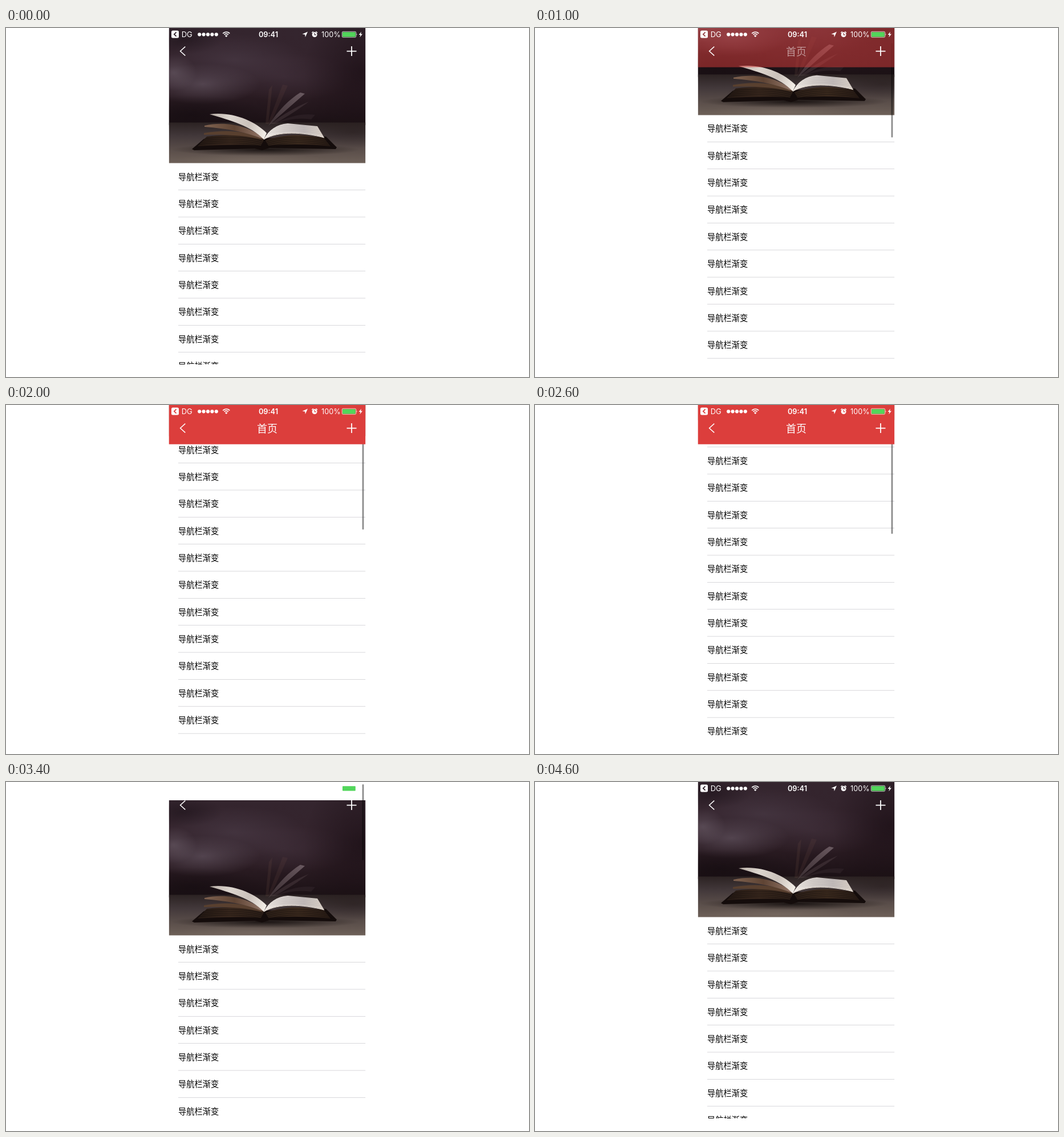
Write an HTML page with a canvas that moves like this. It is 917 by 611 pixels and loops after 4.8 s.

```html
<!DOCTYPE html>
<html lang="zh-CN">
<head>
<meta charset="utf-8">
<title>导航栏渐变</title>
<style>
html, body { margin: 0; width: 100%; height: 100%; overflow: hidden; background: #fff; }
canvas { display: block; width: 917px; height: 611px; }
</style>
</head>
<body>
<canvas id="stage"></canvas>
<script>
const W = 917, H = 611, LEFT = 285.5, RIGHT = 630.4, BOTTOM = 589;
const PHOTO = 236.6, ROW = 47.35, ROWS = 40, NAV = 68.7;
const STEP = 200;
const CJK = '"Noto Sans CJK SC", "Noto Sans CJK", sans-serif';
const LATIN = 'Inter, Roboto, sans-serif';
// Scroll offset per screen refresh: drag up, pull back, overscroll, settle.
const SCROLL = [0, 0, 0, 0, 35.5, 84.2, 98, 107.5, 133, 159, 182, 205.5,
  227.7, 210, 177.5, 56, -8, -32, -17, -0.4, 0, 0, 0, 0];

const canvas = document.getElementById('stage');
const ratio = window.devicePixelRatio || 1;
canvas.width = W * ratio;
canvas.height = H * ratio;
const ctx = canvas.getContext('2d');

function shape(d, fill) {
  ctx.fillStyle = fill;
  ctx.fill(new Path2D(d), 'evenodd');
}

function line(d, color, width) {
  ctx.strokeStyle = color;
  ctx.lineWidth = width;
  ctx.stroke(new Path2D(d));
}

function text(str, x, y, font, color, align = 'left') {
  ctx.font = font;
  ctx.fillStyle = color;
  ctx.textAlign = align;
  ctx.fillText(str, x, y);
}

function disc(x, y, r) {
  ctx.beginPath();
  ctx.arc(x, y, r, 0, Math.PI * 2);
  ctx.fill();
}

function fade(x0, y0, x1, y1, ...colors) {
  const g = ctx.createLinearGradient(x0, y0, x1, y1);
  colors.forEach((c, i) => g.addColorStop(i / (colors.length - 1), c));
  return g;
}

function glow(x, y, rx, ry, rgb, alpha) {
  ctx.save();
  ctx.translate(x, y);
  ctx.scale(rx, ry);
  const g = ctx.createRadialGradient(0, 0, 0, 0, 0, 1);
  g.addColorStop(0, `rgba(${rgb},${alpha})`);
  g.addColorStop(0.5, `rgba(${rgb},${alpha * 0.5})`);
  g.addColorStop(1, `rgba(${rgb},0)`);
  ctx.fillStyle = g;
  ctx.fillRect(-1, -1, 2, 2);
  ctx.restore();
}

function drawBook() {
  // covers and page block
  shape('M326 212 L347 194 L452 193 L561 190 L580 209 L578 212 L462 210 L449 214 L436 211 L330 214Z', '#140c0b');
  shape('M336 207 L352 190 C390 185 430 187 452 196 L447 206 C410 203 372 205 336 207Z',
    fade(336, 0, 450, 0, '#231813', '#38271d', '#2b1e17'));
  shape('M455 197 C490 183 530 187 558 193 L569 207 C530 203 490 203 460 206Z',
    fade(455, 0, 570, 0, '#2b1e17', '#3b2a1e', '#281b15'));
  for (let i = 0; i < 4; i++) {
    const y = i * 3.2;
    line(`M${348 - y} ${194 + y} C380 ${190 + y} 425 ${190 + y} 449 ${198 + y}`, 'rgba(16,11,9,.55)', 0.9);
    line(`M457 ${199 + y} C490 ${188 + y} 530 ${190 + y} ${561 + y} ${196 + y}`, 'rgba(16,11,9,.55)', 0.9);
  }
  // lifted pages
  shape('M347 184 C385 177 425 180 452 196 C420 188 385 186 347 187Z', '#59402f');
  shape('M348 171 C388 162 432 173 453 195 C420 182 388 176 348 173Z', fade(348, 0, 453, 0, '#7f6250', '#5f4434', '#95786a'));
  shape('M357 151 C396 146 436 162 457 184 L452 195 C429 171 394 162 357 151Z',
    fade(357, 150, 456, 190, '#b9aea6', '#dcd5ce', '#cbc2bb', '#f6f1ea'));
  shape('M452 195 C461 178 474 169 494 167 L546 172 L558 192 C520 182 478 180 452 195Z',
    fade(452, 0, 558, 0, '#f3eee8', '#d4cdca', '#c2bbba', '#dcd2c8'));
  line('M452 195 C478 180 520 182 558 192', '#eae1d6', 1);
  for (let i = 0; i < 4; i++) {
    line(`M${470 - i * 3} ${175 + i * 3} C495 ${168 + i * 3} 520 ${170 + i * 3} ${546 + i * 3} ${175 + i * 3.5}`, 'rgba(120,110,112,.2)', 0.7);
  }
}

function drawPhoto() {
  ctx.save();
  ctx.beginPath();
  ctx.rect(LEFT, 0, RIGHT - LEFT, PHOTO);
  ctx.clip();
  ctx.fillStyle = fade(0, 0, 0, 170, '#34252e', '#34242d', '#2b1c23', '#1a1014');
  ctx.fillRect(LEFT, 0, 346, 170);
  glow(345, 98, 100, 36, '118,104,118', 0.5);
  glow(294, 78, 40, 32, '118,104,116', 0.5);
  glow(400, 56, 125, 46, '92,78,92', 0.36);
  glow(490, 86, 120, 42, '84,66,80', 0.32);
  glow(622, 75, 100, 120, '24,12,18', 0.6);
  glow(325, 152, 130, 34, '20,12,16', 0.6);
  glow(310, 20, 70, 26, '26,17,24', 0.5);

  ctx.fillStyle = fade(0, 165, 0, PHOTO, '#2b2222', '#42383a', '#594d49', '#6d6058');
  ctx.fillRect(LEFT, 165.5, 346, 72);
  glow(610, 182, 100, 28, '34,24,23', 0.45);
  glow(455, 213, 165, 11, '12,7,6', 0.8);
  glow(430, 231, 130, 12, '140,126,114', 0.3);

  // pages in motion
  shape('M455 168 L461 108 L467 100 L460 168Z', 'rgba(105,74,68,.2)');
  shape('M459 168 L485 99 L494 101 L465 165Z', 'rgba(105,74,68,.18)');
  shape('M460 171 C477 144 498 124 516 113 L524 115 C504 132 484 150 465 167Z',
    fade(460, 171, 524, 113, 'rgba(115,98,102,.35)', 'rgba(138,122,128,.65)'));
  shape('M464 168 C487 150 509 138 531 129 C513 142 491 157 470 168Z', 'rgba(110,90,95,.28)');
  shape('M470 168 C495 154 520 149 542 152 L535 160 C515 157 494 159 475 168Z', 'rgba(90,72,78,.18)');
  drawBook();
  ctx.restore();
}

function drawRows(top) {
  for (let i = 0; i < ROWS; i++) {
    const y = top + i * ROW;
    if (y > BOTTOM) break;
    text('导航栏渐变', 302, y + 29, '14.25px ' + CJK, '#000');
    ctx.fillStyle = '#c8c7cc';
    ctx.fillRect(302, y + ROW - 0.7, RIGHT - 302, 0.7);
  }
}

function drawBar(scroll, alpha) {
  const top = 4 + 0.27 * Math.max(scroll, 0);
  const len = 165 + Math.min(scroll, 0);
  ctx.fillStyle = `rgba(0,0,0,${0.45 * alpha})`;
  ctx.beginPath();
  ctx.roundRect(624.6, top, 2.8, len, 1.4);
  ctx.fill();
}

function drawNav(alpha) {
  ctx.globalAlpha = alpha;
  ctx.fillStyle = '#dc3e3c';
  ctx.fillRect(LEFT, 0, RIGHT - LEFT, NAV);
  text('首页', 458, 47.8, '500 18px ' + CJK, '#fff', 'center');
  ctx.globalAlpha = 1;
  line('M314.3 32.6 L305.6 40.5 L314.3 48.4', '#fff', 1.5);
  line('M597.5 40.6 H614.5 M606 32.1 V49.1', '#fff', 1.8);
}

function drawStatus() {
  const white = '#fff';
  shape('M292.5 4.5 H300.5 Q303 4.5 303 7 V15 Q303 17.5 300.5 17.5 H292.5 Q290 17.5 290 15 V7 Q290 4.5 292.5 4.5Z' +
    'M298 6.8 L293.6 11 L298 15.2 L299.2 14 L296.1 11 L299.2 8Z', white);
  text('DG', 317.2, 15.6, '13px ' + LATIN, white, 'center');
  for (let i = 0; i < 5; i++) disc(339.2 + i * 7.4, 11.3, 3.1);

  ctx.strokeStyle = white;
  ctx.lineWidth = 1.7;
  for (const r of [5, 8.2]) {
    ctx.beginPath();
    ctx.arc(386.2, 15.2, r, -Math.PI * 0.76, -Math.PI * 0.24);
    ctx.stroke();
  }
  shape('M386.2 16 L383.9 13.4 Q386.2 11.6 388.5 13.4Z', white);

  text('09:41', 460, 15.7, '600 12.8px ' + LATIN, white, 'center');
  shape('M529 6.5 L524.8 16 L524.2 11.4 L519.5 10.8Z', white);
  shape('M536.6 11.6 a4.5 4.5 0 1 0 9 0 a4.5 4.5 0 1 0 -9 0Z' +
    'M540.6 8.6 H541.7 V11.3 H543.8 V12.4 H540.6Z', white);
  line('M536.3 8.5 L538.8 6.3 M545.9 8.5 L543.4 6.3', white, 1.5);
  text('100%', 569.8, 15.7, '12.7px ' + LATIN, white, 'center');

  ctx.strokeStyle = white;
  ctx.lineWidth = 0.7;
  ctx.beginPath();
  ctx.roundRect(589.2, 6.3, 24.6, 10, 1.8);
  ctx.stroke();
  ctx.fillStyle = '#52d65b';
  ctx.beginPath();
  ctx.roundRect(590, 7.2, 22.8, 8.2, 0.9);
  ctx.fill();
  shape('M614.6 9.5 Q616.4 11.3 614.6 13.1Z', white);
  shape('M623 6.5 L618.6 12 H621.4 L620.3 16.3 L625 10.4 H622Z', white);
}

function draw(now) {
  const step = Math.floor(now / STEP) % SCROLL.length;
  const scroll = SCROLL[step];
  const barAlpha = step < 4 || step > 20 ? 0 : step === 20 ? 0.6 : 1;
  const navAlpha = Math.min(1, Math.max(0, scroll / (PHOTO - NAV)));

  ctx.setTransform(ratio, 0, 0, ratio, 0, 0);
  ctx.fillStyle = '#fff';
  ctx.fillRect(0, 0, W, H);
  ctx.save();
  ctx.beginPath();
  ctx.rect(LEFT, 0, RIGHT - LEFT, BOTTOM);
  ctx.clip();
  ctx.save();
  ctx.translate(0, -scroll);
  drawPhoto();
  ctx.restore();
  drawRows(PHOTO - scroll);
  drawBar(scroll, barAlpha);
  drawNav(navAlpha);
  drawStatus();
  ctx.restore();
}

const start = performance.now();
function tick() {
  draw(performance.now() - start);
  requestAnimationFrame(tick);
}
tick();
</script>
</body>
</html>
```
